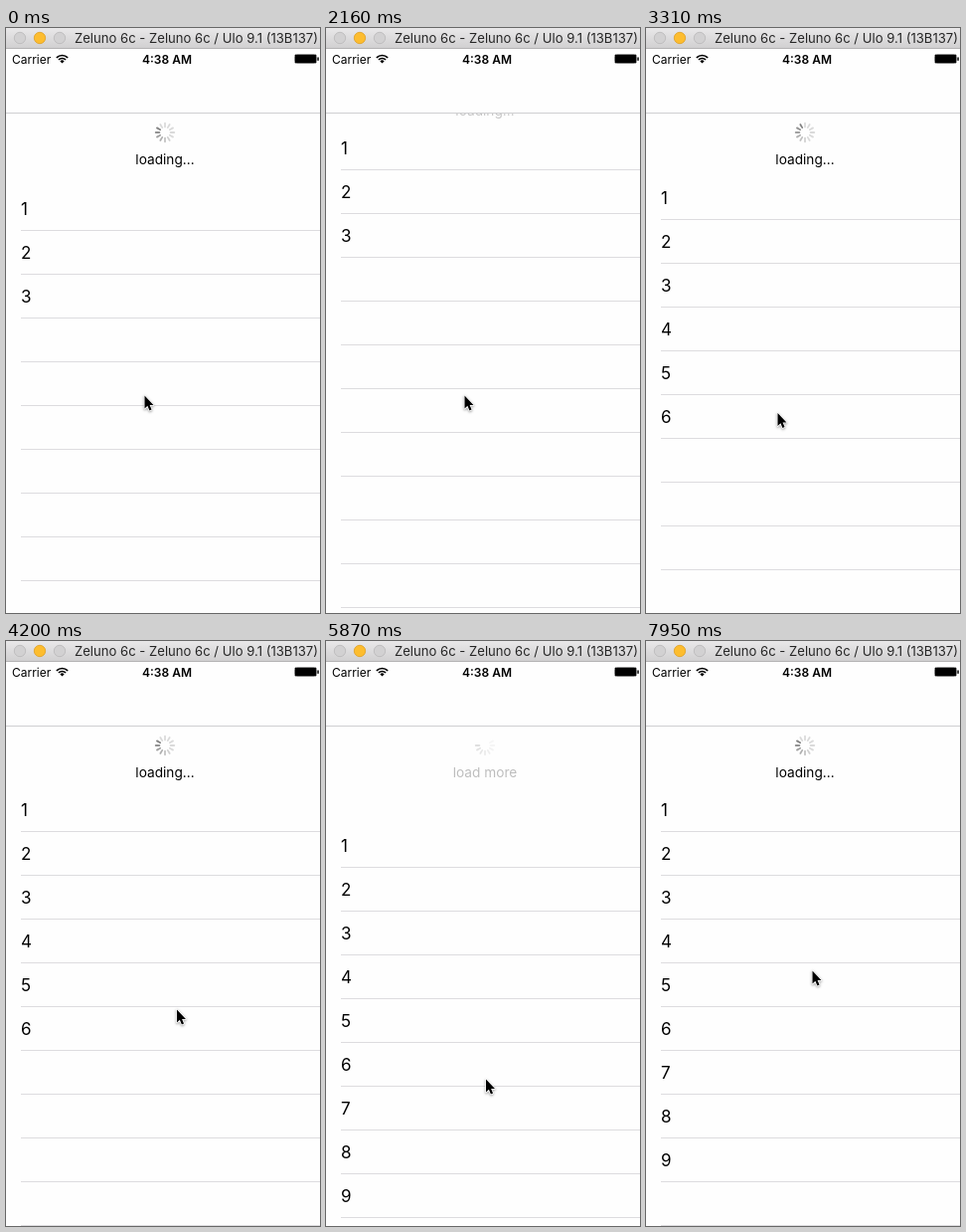
Animation, 316 px wide and 588 px high, one loop 8 s. Source, as an HTML page with a canvas:

```html
<!DOCTYPE html>
<html lang="en">
<head>
<meta charset="utf-8">
<title>Pull to refresh</title>
<style>
  html, body { margin: 0; width: 100%; height: 100%; overflow: hidden; background: #fefefe; }
  canvas { display: block; width: 316px; height: 588px; }
</style>
</head>
<body>
<canvas id="stage"></canvas>
<script>
const W = 316, H = 588, LOOP = 8000;
const NAV = 85, ROW = 44, REST = 63, TICK = 1000 / 12;
const SANS = 'Inter, "Open Sans", sans-serif';
const canvas = document.getElementById('stage');
const ctx = canvas.getContext('2d');
const ratio = window.devicePixelRatio || 1;
canvas.width = W * ratio;
canvas.height = H * ratio;

// Each cycle: pull down, spring back to the loading position, collapse.
const cycles = [
  { trigger: 0, peak: 75, tau: 180, collapse: 1885, lead: 10 },
  { pull: 2600, mid: [2910, 55, 0.33], trigger: 3040, peak: 96, tau: 80, collapse: 5112, lead: 8 },
  { pull: 5560, mid: [5870, 99, 0.25], trigger: 6010, peak: 122, tau: 120, collapse: Infinity, lead: 11 }
];
const COLLAPSE_MS = 400;

// time, x, y of the pointer tip
const pointer = [
  [0, 139.5, 369], [2350, 139.5, 369], [2590, 141, 290], [2910, 137.5, 373.5],
  [3050, 135, 420], [3310, 132.5, 386.5], [4140, 172, 370], [5000, 170.5, 367],
  [5300, 170.5, 367], [5560, 166, 280], [5870, 161, 440], [6010, 160, 470],
  [6700, 167.5, 331], [LOOP, 167.5, 331]
];

const clamp = v => Math.min(1, Math.max(0, v));
const smooth = p => p * p * (3 - 2 * p);
const lerp = (a, b, p) => a + (b - a) * p;

function pointerAt(t) {
  const i = Math.max(1, pointer.findIndex(k => k[0] > t));
  const a = pointer[i - 1], b = pointer[i];
  const p = smooth(clamp((t - a[0]) / (b[0] - a[0])));
  return [lerp(a[1], b[1], p), lerp(a[2], b[2], p)];
}

function stateAt(t) {
  const n = t >= cycles[2].pull ? 2 : t >= cycles[1].pull ? 1 : 0;
  const c = cycles[n];
  const state = { offset: 0, alpha: 1, rows: 3 * (n + 1), loading: true, lead: c.lead + Math.floor(t / TICK), ticks: 12 };
  if (t < c.trigger) {
    const [mt, mo, ma] = c.mid;
    const early = t < mt;
    const p = early ? (t - c.pull) / (mt - c.pull) : (t - mt) / (c.trigger - mt);
    state.offset = early ? mo * Math.pow(p, 1.4) : lerp(mo, c.peak, p);
    state.alpha = early ? ma * clamp(p * 2 - 1) : lerp(ma, 0.75, p);
    state.loading = false;
    state.lead = 9;
    state.ticks = Math.min(12, Math.round(state.alpha * 31));
  } else if (t < c.collapse) {
    state.offset = REST + (c.peak - REST) * Math.exp((c.trigger - t) / c.tau);
  } else {
    const p = clamp((t - c.collapse) / COLLAPSE_MS);
    state.offset = REST * (1 - smooth(p));
    state.alpha = state.offset / REST;
    if (t > c.collapse + COLLAPSE_MS) state.rows += 3;
  }
  state.offset = Math.round(state.offset);
  return state;
}

function text(str, x, y, size, color = '#000', align = 'left', weight = 400) {
  ctx.font = `${weight} ${size}px ${SANS}`;
  ctx.textAlign = align;
  ctx.fillStyle = color;
  ctx.fillText(str, x, y);
}

function disc(x, y, r, fill, stroke) {
  ctx.beginPath();
  ctx.arc(x, y, r, 0, Math.PI * 2);
  ctx.fillStyle = fill;
  ctx.fill();
  ctx.strokeStyle = stroke;
  ctx.lineWidth = 0.8;
  ctx.stroke();
}

function drawTitleBar() {
  const g = ctx.createLinearGradient(0, 0, 0, 20);
  g.addColorStop(0, '#e9e8e9');
  g.addColorStop(1, '#d1d0d1');
  ctx.fillStyle = g;
  ctx.fillRect(0, 0, W, 20);
  ctx.fillStyle = '#b4b3b4';
  ctx.fillRect(0, 20, W, 1);
  disc(14, 10, 5.7, '#d2d1d2', '#b9b8b9');
  disc(34, 10, 5.7, '#fdbd2f', '#dfa023');
  disc(54, 10, 5.7, '#d2d1d2', '#b9b8b9');
  text('Zeluno 6c - Zeluno 6c / Ulo 9.1 (13B137)', 69, 15, 13.1, '#262626');
}

function drawWifi(x, y) {
  ctx.strokeStyle = '#000';
  ctx.lineWidth = 1.7;
  for (const r of [5, 8]) {
    ctx.beginPath();
    ctx.arc(x, y, r, -Math.PI * 0.75, -Math.PI * 0.25);
    ctx.stroke();
  }
  ctx.beginPath();
  ctx.moveTo(x, y);
  ctx.arc(x, y, 3, -Math.PI * 0.75, -Math.PI * 0.25);
  ctx.fillStyle = '#000';
  ctx.fill();
}

function drawStatusBar() {
  text('Carrier', 6, 35.5, 12);
  drawWifi(56.5, 35.5);
  text('4:38 AM', 162, 35.5, 12, '#000', 'center', 600);
  ctx.strokeStyle = '#888';
  ctx.lineWidth = 1;
  ctx.beginPath();
  ctx.roundRect(290.5, 26.5, 22, 9, 1.8);
  ctx.stroke();
  ctx.fillStyle = '#000';
  ctx.fillRect(291, 27, 21, 8);
  ctx.beginPath();
  ctx.roundRect(313.3, 29.3, 1.5, 3.6, 0.7);
  ctx.fill();
}

function drawSpinner(y, s) {
  ctx.save();
  ctx.translate(160, y);
  ctx.lineWidth = 1.8;
  ctx.lineCap = 'round';
  for (let k = 0; k < s.ticks; k++) {
    const a = (s.lead - k) * Math.PI / 6;
    const dx = Math.sin(a), dy = -Math.cos(a);
    ctx.strokeStyle = `rgba(0,0,0,${s.alpha * Math.max(0.14, 0.48 - 0.06 * k)})`;
    ctx.beginPath();
    ctx.moveTo(dx * 5.6, dy * 5.6);
    ctx.lineTo(dx * 9.3, dy * 9.3);
    ctx.stroke();
  }
  ctx.restore();
}

function drawList(s) {
  ctx.save();
  ctx.beginPath();
  ctx.rect(0, NAV, W, H - NAV);
  ctx.clip();
  if (s.offset > 0) {
    const shift = Math.min(0, s.offset - REST);
    drawSpinner(105 + shift, s);
    text(s.loading ? 'loading...' : 'load more', 160, 136.5 + shift, 13.7, `rgba(0,0,0,${s.alpha})`, 'center');
  }
  for (let i = 0, y = 128 + s.offset; y < H + ROW; i++, y += ROW) {
    ctx.fillStyle = '#dddcdf';
    ctx.fillRect(15, y, W - 15, 1);
    if (i < s.rows) text(String(i + 1), 15, y - 15, 17);
  }
  ctx.restore();
  ctx.fillStyle = '#cfcfd1';
  ctx.fillRect(0, NAV, W, 1);
}

function drawPointer([x, y]) {
  ctx.save();
  ctx.translate(x, y + 0.5);
  ctx.scale(0.88, 0.92);
  const arrow = new Path2D('M0 0V14.2L3.3 11.2L5.6 16.3L8 15.3L5.8 10.3H10.2Z');
  ctx.shadowColor = 'rgba(0,0,0,.4)';
  ctx.shadowBlur = 2.5 * ratio;
  ctx.shadowOffsetY = ratio;
  ctx.lineJoin = 'round';
  ctx.lineWidth = 1.8;
  ctx.strokeStyle = '#fff';
  ctx.stroke(arrow);
  ctx.shadowColor = 'transparent';
  ctx.fillStyle = '#000';
  ctx.fill(arrow);
  ctx.restore();
}

function draw(t) {
  ctx.setTransform(ratio, 0, 0, ratio, 0, 0);
  ctx.fillStyle = '#fefefe';
  ctx.fillRect(0, 0, W, H);
  drawTitleBar();
  drawStatusBar();
  drawList(stateAt(t));
  drawPointer(pointerAt(t));
}

const start = performance.now();
function tick() {
  draw((performance.now() - start) % LOOP);
  requestAnimationFrame(tick);
}
tick();
</script>
</body>
</html>
```
